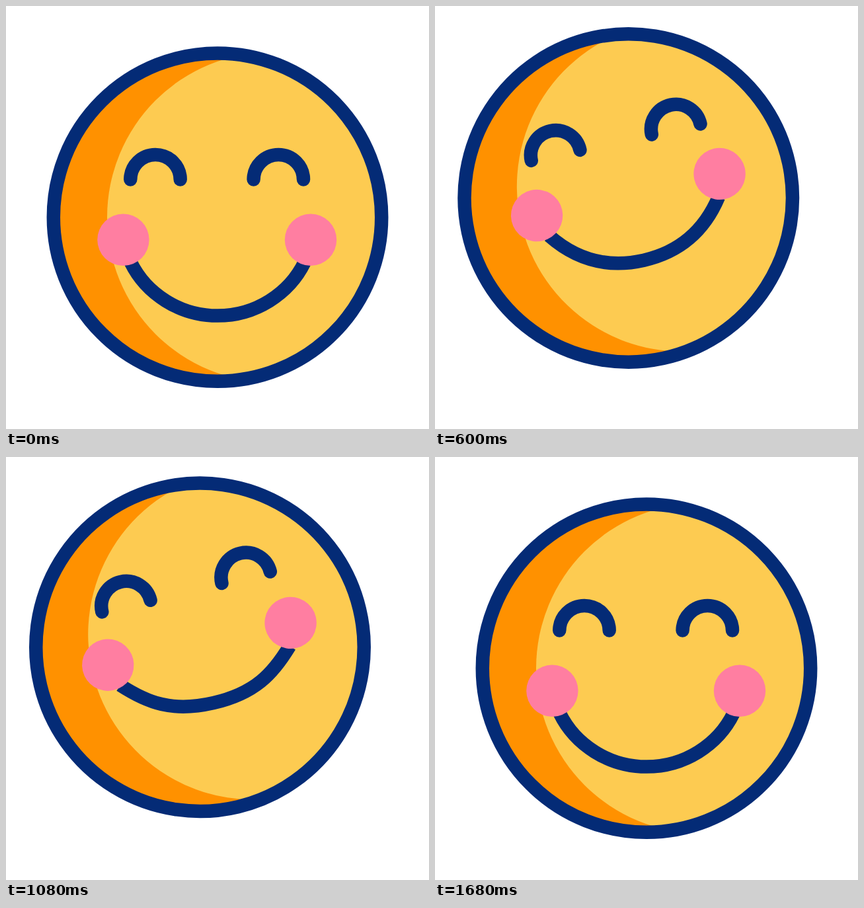
An HTML page for the animation above (2 s loop, 640 by 640 pixels).

```html
<!DOCTYPE html>
<html lang="en">
<head>
<meta charset="utf-8">
<title>Laughing face</title>
<style>
  html, body { margin: 0; height: 100%; overflow: hidden; background: #fff; }
  svg { display: block; width: 100vw; height: 100vh; }
  .line { fill: none; stroke: #042b76; stroke-width: 20.5; }
</style>
</head>
<body>
<svg viewBox="0 0 640 640">
  <clipPath id="disc"><circle r="246"/></clipPath>
  <g id="body">
    <circle r="246" fill="#ff9100"/>
    <circle cx="83" r="250" fill="#fdcb51" clip-path="url(#disc)"/>
    <circle class="line" r="248.2"/>
    <path id="eyes" class="line" stroke-linecap="round"
      d="M-131.7 0a37.7 37.7 0 0 1 75.4 0M54.6 0a37.7 37.7 0 0 1 75.4 0"/>
  </g>
  <g id="cheeks">
    <path id="mouth" class="line"/>
    <g fill="#ff7ea1"><circle cx="-141.8" r="39.2"/><circle cx="141.8" r="39.2"/></g>
  </g>
</svg>
<script>
const LOOP = 2000, STEP = 40, RISEN = 360, FALL = 1200, END = 1680;
const el = id => document.getElementById(id);
const ease = u => (1 - Math.cos(Math.PI * Math.min(1, Math.max(0, u)))) / 2;

// Starts at rest, eases through [time, value] turning points, and rests again at END.
function swing(...turns) {
  const keys = [[0, 0], ...turns, [END, 0]];
  return t => keys.slice(1).reduce((value, [time, next], i) => {
    const [from, last] = keys[i];
    return value + (next - last) * ease((t - from) / (time - from));
  }, 0);
}

const sway = swing([300, 22], [562, -31.5], [784, 28.5], [1050, -28.5], [1305, 30.5]);
const tilt = swing([320, 13], [574, -13], [815, 14.7], [1072, -13.5], [1345, 7.6]);
const cheekTilt = swing([340, 14], [612, -13], [785, 15.4], [1079, -13], [1343, 7.2]);
const bob = swing([RISEN, -28.5], [FALL, -32]);

// The features jump up with the face but drop back sooner than it does.
const lift = t => ease(t / RISEN) - ease((t - FALL) / 360);
// The smile flattens steadily, then springs back.
const flatness = t => t < FALL ? t / FALL : 1 - ease((t - FALL) / (END - FALL));

function mouthPath(flat) {
  const depth = 114.8 - 25.5 * flat, h = 57 + 8 * flat;
  const x = 108 - 12 * flat, y = 82 - 14 * flat;
  return `M-130.5 34C${1 - x} ${y} ${1 - h} ${depth} 1 ${depth}S${1 + x} ${y} 132.5 34`;
}

function place(id, x, y, angle = 0) {
  el(id).setAttribute('transform', `translate(${x} ${y}) rotate(${angle})`);
}

function draw(now) {
  const t = Math.floor(now % LOOP / STEP) * STEP;
  const x = 320 + sway(t), y = 319.6 + bob(t);
  const angle = tilt(t), cheekAngle = cheekTilt(t);
  place('body', x, y, angle);
  place('eyes', 0, -57 - 29.4 * lift(t));
  place('cheeks', x - .8 - .6 * (cheekAngle - angle), y + 34.2 - 39.2 * lift(t), cheekAngle);
  el('mouth').setAttribute('d', mouthPath(flatness(t)));
  requestAnimationFrame(draw);
}
draw(performance.now());
</script>
</body>
</html>
```
